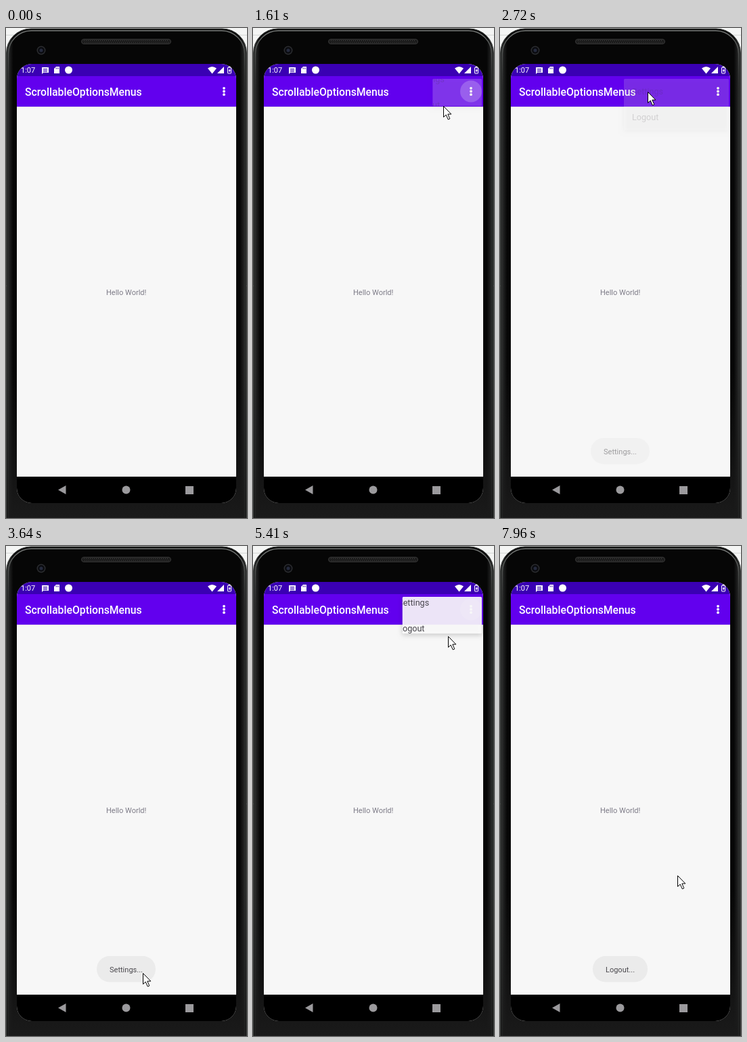
An HTML page with a canvas that plays this animation: 356 px wide and 723 px high, repeating every 8000 ms.

```html
<!DOCTYPE html>
<html lang="en">
<head>
<meta charset="utf-8">
<title>Options menu</title>
<style>
html, body { margin: 0; width: 100%; height: 100%; overflow: hidden; background: #f4f5f4; }
canvas { display: block; width: 356px; height: 723px; }
</style>
</head>
<body>
<canvas id="stage" width="356" height="723"></canvas>
<script>
const ctx = document.getElementById('stage').getContext('2d');
const W = 356, H = 723, LOOP = 8000;
const FONT = 'Roboto, sans-serif';
const STATUS = '#3a00b3', NAV = '#9b9a9d';
const MENU = { left: 183, top: 75, right: 338, row: 37.8 };

// Each visit taps the button, then picks one menu row
const ITEMS = ['Settings', 'Logout'];
const VISITS = [{ tap: 1340, pick: 2530 }, { tap: 5043, pick: 6095 }];

const clamp = v => Math.max(0, Math.min(1, v));
const ramp = (t, start, length) => clamp((t - start) / length);
const smooth = u => u * u * (3 - 2 * u);
const settle = u => 1 - Math.pow(1 - u, 2.7);

const glides = [];
function glide(start, end, x, y, bow = 0, ease = smooth) {
  glides.push({ start, end, x, y, bow, ease });
}
// Passes back and forth below a toast
function sweep(start, gap, count, right, left, y) {
  for (let i = 0; i < count; i++) {
    glide(start + gap * i, start + gap * i + 180, i % 2 ? left : right, y);
  }
}

glide(0, 70, 215, 711);
glide(70, 1150, 318, 83, 0, settle);
glide(1230, 2160, 218, 94, 31);
glide(2720, 3330, 150, 642);
sweep(3400, 245, 2, 202, 147, 630);
glide(3870, 4320, 317, 138);
glide(4500, 4950, 323, 85);
glide(5130, 5870, 214, 132, 39);
glide(6091, 6550, 157, 638);
sweep(6880, 345, 3, 210, 177, 639);
glide(7840, 7960, 262, 486);

function rect(x, y, w, h, color) {
  ctx.fillStyle = color;
  ctx.fillRect(x, y, w, h);
}

function round(x, y, w, h, r) {
  ctx.beginPath();
  ctx.roundRect(x, y, w, h, r);
}

function disc(x, y, r, color) {
  ctx.beginPath();
  ctx.arc(x, y, r, 0, Math.PI * 2);
  ctx.fillStyle = color;
  ctx.fill();
}

function shape(path, color) {
  ctx.fillStyle = color;
  ctx.fill(new Path2D(path));
}

function outline(color, width = 1) {
  ctx.strokeStyle = color;
  ctx.lineWidth = width;
  ctx.stroke();
}

function gradient(x, y, ...colors) {
  const g = ctx.createLinearGradient(0, 0, x, y);
  colors.forEach(([at, color]) => g.addColorStop(at, color));
  return g;
}

function text(str, x, y, size, color, weight = 400, align = 'left') {
  ctx.font = `${weight} ${size}px ${FONT}`;
  ctx.textAlign = align;
  ctx.fillStyle = color;
  ctx.fillText(str, x, y);
}

function drawPhone() {
  rect(0, 0, W, H, '#f4f5f4');
  rect(0, 10, W, 1, '#d5d8d6');

  round(0.5, 1, W - 1, H + 60, 36);
  ctx.fillStyle = gradient(W, 0, [0, '#303231'], [0.012, '#232424'], [0.03, '#060606'],
    [0.97, '#060606'], [0.988, '#232424'], [1, '#303231']);
  ctx.fill();
  ctx.fillStyle = gradient(0, H, [0.7, 'rgba(26,26,26,0)'], [1, 'rgba(26,26,26,1)']);
  ctx.fill();
  outline('#3c3f3d');
  round(3.5, 4, W - 7, H + 60, 34);
  outline(gradient(0, 90, [0, '#7d807e'], [1, 'rgba(50,52,51,.3)']), 1.4);

  round(111.5, 16.5, 132, 7, 3.5);
  ctx.fillStyle = '#1c1c1c';
  ctx.fill();
  outline('#383838');
  for (let x = 115; x < 241; x += 3) {
    rect(x, 18, 1, 1, '#484848');
    rect(x + 1, 21, 1, 1, '#3c3c3c');
  }

  disc(52, 33, 6.5, '#2c2d30');
  disc(52, 33, 5, '#0b0c10');
  disc(52, 33, 2.5, '#252a3d');
}

function drawStatus() {
  text('1:07', 22, 66, 11, '#fff');

  shape('M53 58h10v8h-8l-2 2z', '#fff');
  for (let y = 60; y < 65; y += 2) rect(55, y, 6, 1, STATUS);

  shape('M74 57h5v10h-8v-7z', '#fff');
  for (let x = 73.5; x < 78; x += 1.8) rect(x, 58.5, 0.8, 2, STATUS);

  disc(92.5, 62, 5.5, '#fff');

  shape('M304.5 67.5l-6.5-8q6.5-5 13 0z', '#fff');
  shape('M312 67l10-10v10z', '#fff');

  rect(328.6, 56.6, 2.8, 1.5, '#fff');
  round(327.5, 58.2, 5, 8.8, 0.5);
  outline('#fff');
  shape('M330.6 59.5l-2 4h1.2v2.5l2-4h-1.2z', '#fff');
}

function drawApp() {
  ctx.save();
  round(16, 53, 324, 648, 22);
  ctx.clip();
  rect(16, 53, 324, 648, '#f7f7f7');
  rect(16, 53, 324, 18, STATUS);
  rect(16, 71, 324, 45, '#6200ee');
  rect(16, 116, 324, 1, '#e6e4e9');
  rect(16, 662, 324, 39, '#000');
  ctx.restore();

  drawStatus();
  text('ScrollableOptionsMenus', 28, 99.5, 15.76, '#fff', 500);
  text('Hello World!', 177.7, 393.5, 11.03, '#7d7b87', 400, 'center');

  shape('M77 681.5l11.5-6.5v13z', NAV);
  disc(177.5, 681.5, 6, NAV);
  rect(265, 676, 12, 12, NAV);
}

function drawButton(t) {
  for (const { tap } of VISITS) {
    const grow = ramp(t, tap, 200);
    const fade = 1 - ramp(t, tap + 300, 250);
    if (grow > 0 && fade > 0) disc(322, 93.5, 6 + 10 * grow, `rgba(255,255,255,${0.22 * fade})`);
  }
  for (let i = -1; i <= 1; i++) disc(322, 93.5 + 4.7 * i, 1.9, '#fff');
}

function drawMenu(t, { tap, pick }, picked) {
  const p = ramp(t, tap + 200, 250);
  const alpha = clamp((p - 0.17) * 1.8) * (1 - ramp(t, pick, 230));
  if (alpha <= 0) return;

  // Reveal grows out of the top right corner while the rows slide into place
  const q = 1 - p;
  const left = MENU.left + 115 * q;
  const height = 2 * MENU.row - 44 * Math.pow(q, 0.65);
  const dx = 58.5 * q;
  const dy = -24 * Math.pow(q, 0.75);

  ctx.save();
  ctx.globalAlpha = alpha;
  ctx.shadowColor = 'rgba(0,0,0,.22)';
  ctx.shadowBlur = 7;
  ctx.shadowOffsetY = 2;
  round(left, MENU.top, MENU.right - left, height, 1.5);
  ctx.fillStyle = '#fdfdfd';
  ctx.fill();
  ctx.shadowColor = 'transparent';
  ctx.clip();

  const press = 0.12 * ramp(t, pick - 130, 120);
  rect(MENU.left, MENU.top + MENU.row * picked, 155, MENU.row, `rgba(0,0,0,${press})`);
  ITEMS.forEach((item, i) => text(item, 195 + dx, 98.4 + MENU.row * i + dy, 12.6, '#343238'));
  ctx.restore();
}

function drawToast(t, { pick }, label) {
  const from = pick + 80;
  const alpha = ramp(t, from, 220) * (1 - ramp(t, from + 2020, 200));
  if (alpha <= 0) return;
  ctx.save();
  ctx.globalAlpha = alpha;
  ctx.font = `400 11.03px ${FONT}`;
  const width = ctx.measureText(label).width + 38;
  round(177.5 - width / 2, 605, width, 38.5, 19);
  ctx.fillStyle = '#ebebeb';
  ctx.fill();
  text(label, 177.5, 629, 11.03, '#4b494e', 400, 'center');
  ctx.restore();
}

function pointerAt(t) {
  let x = 0, y = 0;
  for (const g of glides) {
    if (t < g.start) break;
    const u = g.ease(ramp(t, g.start, g.end - g.start));
    x += (g.x - x) * u;
    y += (g.y - y) * u + g.bow * Math.sin(Math.PI * u);
  }
  return [Math.round(x), Math.round(y)];
}

function drawPointer(t) {
  if (t < 70) return;
  const [x, y] = pointerAt(t);
  ctx.save();
  ctx.translate(x + 0.5, y + 0.5);
  const arrow = new Path2D('M0 0v16l3.7-3.4 3.1 6.9 2.5-1.1-3-6.8h5z');
  ctx.fillStyle = '#fff';
  ctx.fill(arrow);
  ctx.lineWidth = 1;
  ctx.strokeStyle = '#000';
  ctx.stroke(arrow);
  ctx.restore();
}

function draw(t) {
  drawPhone();
  drawApp();
  drawButton(t);
  VISITS.forEach((visit, i) => {
    drawMenu(t, visit, i);
    drawToast(t, visit, ITEMS[i] + '...');
  });
  drawPointer(t);
}

const start = performance.now();
function tick() {
  draw((performance.now() - start) % LOOP);
  requestAnimationFrame(tick);
}
tick();
</script>
</body>
</html>
```
